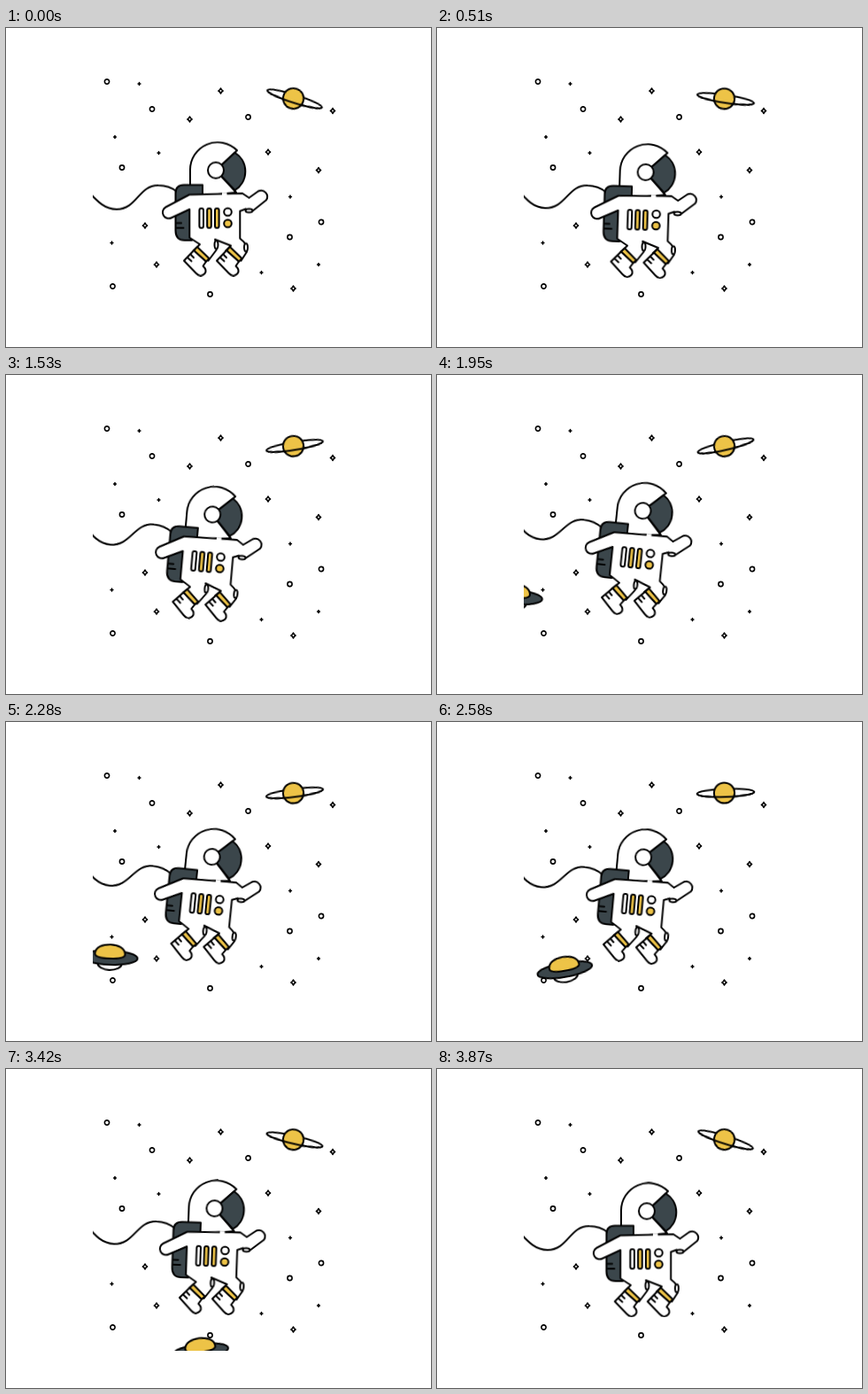
Animation, 480 px wide and 360 px high, one loop 3900 ms. Source, as an HTML page:

```html
<!DOCTYPE html>
<html lang="en">
<head>
<meta charset="utf-8">
<title>Drifting astronaut</title>
<style>
  html, body { margin: 0; width: 100%; height: 100%; overflow: hidden; background: #fff; }
  svg { display: block; width: 480px; height: 360px; }
  .ink { fill: #fff; stroke: #000; stroke-width: 2; stroke-linecap: round; stroke-linejoin: round; }
  .line { fill: none; }
  .dark { fill: #3b464b; }
  .gold { fill: #edc347; }
  .gap { stroke: #fff; stroke-width: 2.8; stroke-linecap: butt; }
  #stars { stroke-width: 1.6; }

  #bob { animation: bob 3.9s -3.12s cubic-bezier(.37, 0, .63, 1) infinite; }
  @keyframes bob {
    0%, 100% { transform: translateY(3.1px); }
    38% { transform: translateY(-7.6px); }
  }
  #astronaut { transform-origin: 237px 117px; animation: lean 3.9s infinite; }
  @keyframes lean {
    0% { transform: rotate(0deg); animation-timing-function: cubic-bezier(.33, .38, .7, .85); }
    52% { transform: rotate(6.1deg); animation-timing-function: cubic-bezier(.5, .12, .8, .85); }
    100% { transform: rotate(0deg); }
  }

  #planet { animation: tilt 3.9s cubic-bezier(.5, .53, .8, 1) infinite; }
  @keyframes tilt {
    0%, 100% { transform: translate(326px, 80px) rotate(17.5deg); }
    50% { transform: translate(326px, 80px) rotate(-13deg); }
  }

  #flight { animation: fly 3.9s linear infinite; }
  @keyframes fly {
    0%, 43% { transform: translate(63px, 238px); }
    100% { transform: translate(263px, 340.5px); }
  }
  #saucer { animation: wobble .4875s -.345s cubic-bezier(.37, 0, .63, 1) infinite alternate; }
  @keyframes wobble {
    from { transform: rotate(-10deg); }
    to { transform: rotate(8deg); }
  }
</style>
</head>
<body>
<svg viewBox="0 0 480 360">
  <defs>
    <clipPath id="scene"><rect x="98" y="42" width="284" height="276"/></clipPath>
    <g id="boot">
      <path class="gold" d="M216 246.5L229.5 259.5L226 263L212 250.5Z"/>
      <path d="M212 250.5L201 262L214.5 276Q219.5 281.5 224.5 276.5Q227.5 272.5 222.5 268L226 263Z"/>
      <path class="line" d="M205 258.5L209.5 262.5M208.5 255L212 258.5"/>
    </g>
    <rect id="bar" x="218.4" y="203" width="4.6" height="22" rx="2"/>
    <circle id="knob" cx="250.5" cy="207" r="4.3"/>
    <ellipse id="fold" cx="237.5" cy="244" rx="2" ry="4.5"/>
  </defs>
  <g class="ink" clip-path="url(#scene)">
    <g id="stars"></g>

    <g id="planet">
      <ellipse rx="32.3" ry="4.6"/>
      <circle class="gold" cx="-1.5" r="11.6"/>
      <path class="line" d="M-32.3 0A32.3 4.6 0 0 0 32.3 0"/>
    </g>

    <g id="flight"><g id="saucer">
      <ellipse cy="7" rx="13.5" ry="7"/>
      <ellipse class="dark" rx="31.3" ry="8"/>
      <path class="gold" d="M-17 -4C-17 -18.5 17 -18.5 17 -4Q17 1 0 1Q-17 1 -17 -4Z"/>
    </g></g>

    <g id="bob"><g id="astronaut">
      <path class="line" d="M92 183C104 196 112 204 125 204C148 204 150 176.5 172 177C182 177 188 180 193 184"/>

      <path d="M208 190V160A31 31 0 0 1 261 137.5L237 160L260 185Z"/>
      <path class="dark" d="M237 160L258.5 140A25 25 0 0 1 258.5 182.5Z"/>
      <circle cx="237" cy="160" r="9"/>

      <path class="dark" d="M191.5 186Q191.5 176.5 201 176.5H222V200L210 239H202Q191.5 239 191.5 228Z"/>
      <path class="line" d="M193 219.5H198M193 225H200.5"/>

      <path d="M207 187.5L180.5 201.5A6.8 6.8 0 0 0 187 213.5L207.3 204V236L219 243.5L211.5 251L228.5 262L237.5 250Q240 244 236 238L254 245L248 251L265.5 262L272 252Q274 244 264.3 237V206L271 203.5Q274.5 208.5 279 205.5L294 193.5A7 7 0 0 0 285 183.5L274.5 191L267 186Z"/>
      <path class="gap" d="M244 186.6H249.5"/>
      <ellipse cx="274.5" cy="205.5" rx="4" ry="2"/>
      <use href="#fold"/>
      <use href="#fold" x="33.5" y="3"/>

      <use href="#boot"/>
      <use href="#boot" x="37"/>

      <use href="#bar"/>
      <use href="#bar" x="8.8" class="gold"/>
      <use href="#bar" x="17.6" class="gold"/>
      <use href="#knob"/>
      <use href="#knob" y="13" class="gold"/>
    </g></g>
  </g>
</svg>
<script>
  // Each kind of star has one outline, drawn at a few fixed points.
  const kinds = [
    ['m-2.6 0a2.6 2.6 0 1 0 5.2 0a2.6 2.6 0 1 0 -5.2 0',
      '114,60.5 165,91.5 273.5,100.5 131,157.5 356,219 320.5,236 120.5,291.5 230.5,300.5'],
    ['m0 -3q.8 2.2 2.6 3q-1.8 .8 -2.6 3q-.8 -2.2 -2.6 -3q1.8 -.8 2.6 -3z',
      '242.5,71 207.5,103 369,93.5 296,140 353,160.5 157,223 170,267 324.5,294'],
    ['m-1.4 0h2.8m-1.4 -1.4v2.8',
      '150.5,63 123,123 172.5,141 321,190.5 119.5,242.5 288.5,276 353,267']
  ];
  document.getElementById('stars').innerHTML = kinds.map(([outline, points]) =>
    `<path d="${points.split(' ').map(p => `M${p}${outline}`).join('')}"/>`).join('');
</script>
</body>
</html>
```
